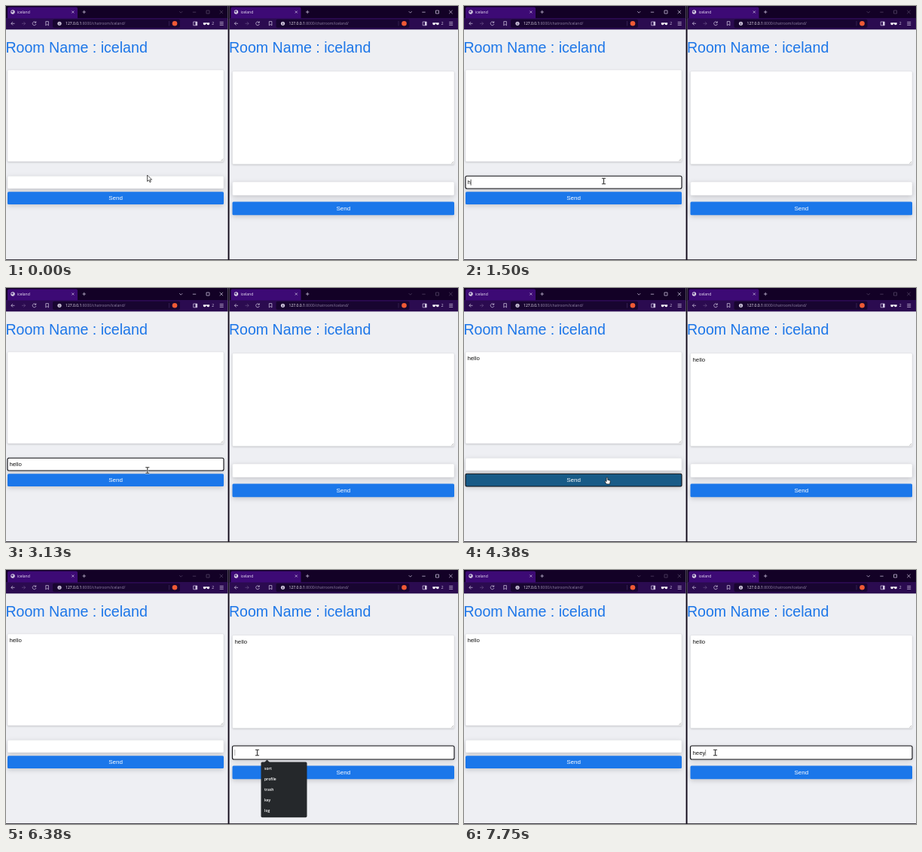
Animation, 600 px wide and 338 px high, one loop 8000 ms. Source, as an HTML page:

```html
<!DOCTYPE html>
<html lang="en">
<head>
<meta charset="utf-8">
<title>Chat room</title>
<style>
  html, body { margin: 0; width: 100%; height: 100%; overflow: hidden; background: #eeeff3; }
  svg { display: block; width: 100vw; height: 100vh; }
  text { white-space: pre; }
  .page { font-family: "Liberation Sans", Arial, sans-serif; font-size: 7.8px; fill: #151515; }
  .page .title { font-size: 19.6px; fill: #1c76e8; }
  .page .send { font-size: 8px; fill: #fff; text-anchor: middle; }
  .ui { font-family: "Open Sans", sans-serif; font-size: 5.06px; }
  .field { fill: #fff; stroke: #d4d6dc; stroke-width: .4; filter: drop-shadow(0 1px 1px rgba(0,0,0,.16)); }
  .raised { filter: drop-shadow(0 2.5px 3px rgba(0,0,0,.17)); }
  .button { fill: #1b77ea; }
  .button.hover { fill: #185b87; }
  .ring { fill: none; stroke: #101014; stroke-width: 1.1; }
  .line { fill: none; stroke: #d9cfe8; stroke-width: .7; }
  .controls { opacity: .35; }
  .active .controls { opacity: 1; }
  .menu text { fill: #fff; font-weight: 600; font-size: 5px; }
</style>
</head>
<body>
<svg id="stage" viewBox="0 0 600 338" preserveAspectRatio="none"></svg>
<script>
const LOOP = 8000, STEP = 125;
const stage = document.getElementById('stage');

const panes = [
  { id: 'left', x: 0, w: 294.5, tab: 0, end: 0, bx: 2, bw: 287,
    log: [85, 122], input: [226.3, 16.7], button: [247.2, 16.8], menu: [40.5, 246.5] },
  { id: 'right', x: 296.5, w: 303.5, tab: 296.5, end: 304.5, bx: 300.5, bw: 294.5,
    log: [86.8, 123.7], input: [234, 18], button: [260.5, 17.7], menu: [338.5, 255.5] },
];

const rect = (x, y, w, h, r, attrs) =>
  `<rect x="${x}" y="${y}" width="${w}" height="${h}" rx="${r}" ${attrs}/>`;
const text = (x, y, content, attrs = '') => `<text x="${x}" y="${y}" ${attrs}>${content}</text>`;
const line = (d, attrs = '') => `<path class="line" d="${d}" ${attrs}/>`;

function browserBar(p) {
  const pillEnd = 231 + p.end;
  return `<g class="ui">
    ${rect(p.x, 0, p.w, 16.5, 0, 'fill="#130126"')}
    ${rect(p.x, 16, p.w, 15.3, 0, 'fill="#2b0b50"')}
    <g transform="translate(${p.tab})">
      <path d="M2 16.5V3.5q0-2 2-2H93q2 0 2 2V16.5z" fill="#3d0a75"/>
      <circle cx="9" cy="8" r="2.7" fill="#ded8e8"/>
      <path d="M7 7l2-1 1 1-1 2-2-1zM10 9l1 0-1 1z" fill="#57348a"/>
      ${text(15, 9.8, 'iceland', 'fill="#eee8f7"')}
      ${line('M87.3 6.5l3 3m0-3l-3 3')}
      ${line('M101.5 8h4.4m-2.2-2.2v4.4')}
      ${line('M11.5 23.3H7m2-2.2l-2.2 2.2 2.2 2.2')}
      ${line('M21 23.3h4.5m-2-2.2l2.2 2.2-2.2 2.2', 'opacity=".35"')}
      ${line('M39.6 22a2.4 2.4 0 1 0 .3 2M39.8 20.4v1.9h-1.9')}
      ${line('M52.8 20.6h3.6v5.3l-1.8-1.5-1.8 1.5z')}
    </g>
    ${rect(62 + p.tab, 17.7, pillEnd - 62 - p.tab, 11.2, 2, 'fill="#180530"')}
    <g transform="translate(${p.tab})">
      <circle cx="71" cy="23.3" r="2.6" fill="#c9c0d6"/>
      <path d="M71 21.7v.6m0 .6v2" stroke="#180530" stroke-width=".7"/>
      ${text(79, 25.2, '127.0.0.1<tspan fill="#8f82a3">:8000/chatroom/iceland/</tspan>', 'fill="#f3eef9"')}
    </g>
    <g transform="translate(${p.end})">
      <path d="M216.5 20v6.5" stroke="#5d4780" stroke-width=".4"/>
      <circle cx="224" cy="23.3" r="3.3" fill="#ef5a35"/>
      ${line('M248.7 21h5v4.8h-5z')}<path d="M251.5 21h2.2v4.8h-2.2z" fill="#d9cfe8"/>
      <path d="M261.8 22.2h8.4v.8a1.8 1.8 0 0 1-3.7 .6h-1a1.8 1.8 0 0 1-3.7-.6z" fill="#fff"/>
      ${text(273.2, 25.2, '2', 'fill="#d9cfe8"')}
      ${line('M283.7 21.4h5m-5 2h5m-5 2h5')}
      <g class="controls">
        ${line('M230.2 7.2l2 2 2-2')}
        ${line('M247.8 8.2h4.4')}
        ${line('M266 6h4v4h-4z')}
        ${line('M283.7 5.8l4.4 4.4m0-4.4l-4.4 4.4')}
      </g>
    </g>
  </g>`;
}

function suggestions(p) {
  const [x, y] = p.menu;
  const items = ['sort', 'profile', 'trash', 'key', 'log'];
  return `<g class="menu ui" id="${p.id}-menu">
    <path d="M${x + 4.5} ${y + .5}l3.5-3.4 3.5 3.4z" fill="#25282b"/>
    ${rect(x, y, 61, 73.7, 1.6, 'fill="#25282b"')}
    ${items.map((item, i) => text(x + 4.5, y + 10.4 + 14 * i, item)).join('')}
  </g>`;
}

function page(p) {
  const { id, bx, bw } = p;
  const [logY, logH] = p.log, [inY, inH] = p.input, [btnY, btnH] = p.button;
  const right = bx + bw, bottom = logY + logH, textX = bx + (p.x ? 3 : 2.4);
  return `<g class="page">
    ${text(p.x - .6, 62, 'Room Name : iceland', 'class="title"')}
    ${rect(bx, logY, bw, logH, 1.5, 'class="field"')}
    <path d="M${right - 3.6} ${bottom - .8}l2.8-2.8m-1 2.8l1-1" stroke="#777" stroke-width=".5"/>
    ${text(textX, logY + 10.8 + (p.x ? .8 : 0), 'hello', `id="${id}-message"`)}
    ${rect(bx, inY, bw, inH, 1.5, 'class="field raised"')}
    ${rect(bx, inY, bw, inH, 2, `class="ring" id="${id}-focus"`)}
    ${text(textX, inY + inH / 2 + 2.6, '', `id="${id}-typed"`)}
    ${rect(0, inY + inH / 2 - 4, .7, 8, 0, `id="${id}-caret"`)}
    ${rect(bx, btnY, bw, btnH, 1.5, `class="button raised" id="${id}-button"`)}
    ${rect(bx, btnY, bw, btnH, 1.5, `class="ring" id="${id}-pressed"`)}
    ${text(bx + bw / 2, btnY + btnH / 2 + 2.7, 'Send', 'class="send"')}
  </g>`;
}

const pointers = `
  <g id="arrow"><path d="M0 0v8.4l2-1.8 1.5 3 1.3-.6-1.4-2.9h2.7z" fill="#fff" stroke="#111" stroke-width=".7"/></g>
  <g id="beam" fill="none" stroke-linecap="square">
    <path d="M-2-3.8H2M0-3.8V3.8M-2 3.8H2" stroke="#fff" stroke-width="1.9"/>
    <path d="M-2-3.8H2M0-3.8V3.8M-2 3.8H2" stroke="#333" stroke-width="1.1"/></g>
  <g id="hand"><path d="M-.9 .5q.9-1.1 1.7 0V3.4l2.5.6q1 .3 .9 1.3l-.7 3.6H-.8L-3 5.6q.2-1.3 1.3-.6l.8.7z"
    fill="#fff" stroke="#111" stroke-width=".7"/></g>`;

stage.innerHTML = rect(0, 0, 600, 338, 0, 'fill="#eeeff3"') +
  panes.map(p => `<g id="${p.id}">${browserBar(p)}${page(p)}${suggestions(p)}</g>`).join('') +
  rect(294.6, 0, 1.9, 338, 0, 'fill="#0d0616"') +
  rect(0, 337.2, 600, .8, 0, 'fill="#1a1420"') + pointers;

const el = id => document.getElementById(id);
const show = (id, on) => { el(id).style.display = on ? '' : 'none'; };
const within = (t, from, to) => t >= from && t < to;

// Latest value whose time has passed
const latest = (list, t) => list.reduce((value, [time, next]) => t >= time ? next : value, '');

const typing = {
  left: [[1500, 'h'], [1625, 'he'], [1750, 'hel'], [2000, 'hell'], [2375, 'hello'], [3750, '']],
  right: [[7125, 'h'], [7250, 'he'], [7375, 'hee'], [7625, 'heey']],
};
const carets = {
  left: [[500, 1125, '#999'], [1500, 2875, '#111'], [3375, 3750, '#111']],
  right: [[5750, 6875, '#999'], [7125, 8000, '#777']],
};
const path = [
  [0, 187.5, 225], [375, 185.5, 233], [2750, 185.5, 233], [3500, 190, 252],
  [4750, 190, 252], [5500, 333.5, 243], [LOOP, 333.5, 243],
];

function pointerAt(t) {
  const i = path.findIndex(([time]) => time > t);
  const [t0, x0, y0] = path[i - 1], [t1, x1, y1] = path[i];
  const k = (t - t0) / (t1 - t0), ease = k * k * (3 - 2 * k);
  return [x0 + (x1 - x0) * ease, y0 + (y1 - y0) * ease];
}

const inside = (p, [y, h], px, py) =>
  px >= p.bx && px <= p.bx + p.bw && py >= y && py <= y + h + .3;

function render(now) {
  const t = Math.floor(now % LOOP / STEP) * STEP;
  const [px, py] = pointerAt(t);
  const leftActive = within(t, 375, 5750);
  let pointer = 'arrow';

  for (const p of panes) {
    const isLeft = p.id === 'left';
    const hover = inside(p, p.button, px, py);
    if (hover) pointer = 'hand';
    if (inside(p, p.input, px, py)) pointer = 'beam';

    el(p.id).classList.toggle('active', leftActive === isLeft);
    el(p.id + '-button').classList.toggle('hover', hover);
    show(p.id + '-focus', isLeft ? within(t, 375, 3750) : t >= 5750);
    show(p.id + '-pressed', isLeft && within(t, 3750, 5750));
    show(p.id + '-menu', isLeft ? within(t, 500, 1500) : within(t, 5875, 7125));
    show(p.id + '-message', t >= 4000);

    const typed = el(p.id + '-typed'), caret = el(p.id + '-caret');
    typed.textContent = latest(typing[p.id], t);
    const blink = carets[p.id].find(([from, to]) => within(t, from, to));
    show(p.id + '-caret', blink);
    if (blink) {
      caret.setAttribute('x', +typed.getAttribute('x') + typed.getComputedTextLength());
      caret.setAttribute('fill', blink[2]);
    }
  }

  for (const id of ['arrow', 'beam', 'hand']) show(id, id === pointer);
  el(pointer).setAttribute('transform', `translate(${px} ${py})`);
}

const start = performance.now();
function tick() {
  render(performance.now() - start);
  requestAnimationFrame(tick);
}
tick();
</script>
</body>
</html>
```
